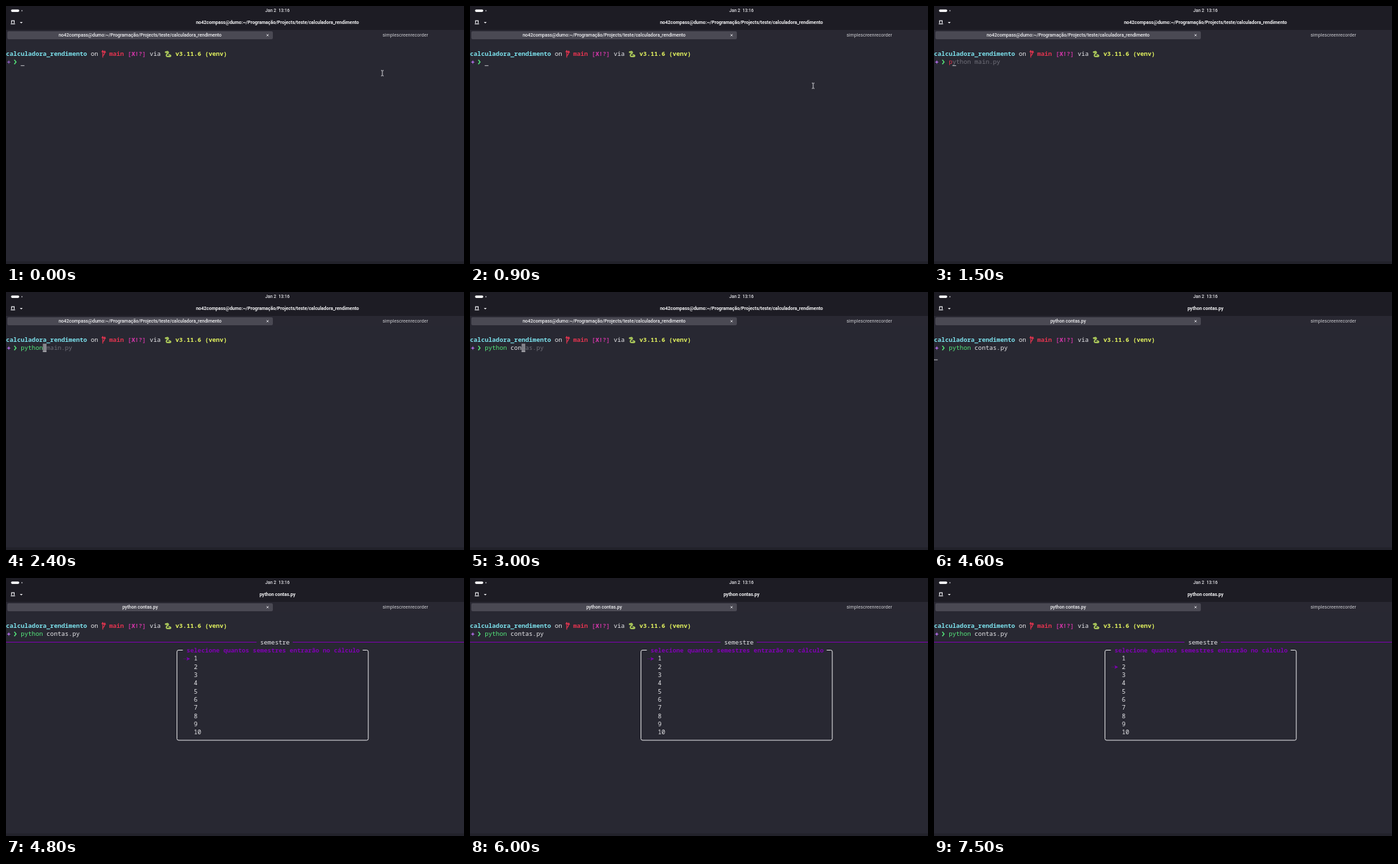
Animation, 690 px wide and 388 px high, one loop 8000 ms. Source, as an HTML page:

```html
<!DOCTYPE html>
<html lang="pt">
<head>
<meta charset="utf-8">
<title>Terminal</title>
<style>
  html, body { margin: 0; width: 100%; height: 100%; overflow: hidden; background: #282832; }
  svg { display: block; width: 690px; height: 388px; }
  text { white-space: pre; }
  .term text { font: 9.25px "Noto Sans Mono", "DejaVu Sans Mono", monospace; fill: #e9e9ec; }
  .term .b { font-weight: 700; }
  .ui text { font: 500 7px Roboto, "Open Sans", sans-serif; fill: #f2f2f4; text-anchor: middle; }
  .ui .title { font-weight: 700; }
  .ui .clock { font-size: 6.7px; fill: #e4e4e8; }
  .ui .idle { font-weight: 400; font-size: 7.1px; fill: #c9c9ce; }
  .term .cyan { fill: #7de3ee; }
  .term .red { fill: #e2344f; }
  .term .pink { fill: #c2359d; }
  .term .lime { fill: #e3f35f; }
  .term .green { fill: #55ea7c; }
  .term .hint { fill: #70707a; }
  .term .purple { fill: #8000b4; }
</style>
</head>
<body>
<svg viewBox="0 0 690 388">
  <rect width="690" height="388" fill="#282832"/>
  <g class="ui">
    <rect width="690" height="36" fill="#1d1c24"/>
    <rect y="36" width="690" height="15" fill="#292832"/>
    <rect x="2" y="38" width="400" height="12" rx="2" fill="#4a4953"/>
    <rect y="384" width="690" height="4" fill="#22222b"/>
    <rect x="7.5" y="5.3" width="12.5" height="3.6" rx="1.8" fill="#f4f4f6"/>
    <circle cx="24" cy="7.1" r="1.2" fill="#85858c"/>
    <text class="clock" x="409" y="9.4">Jan 2&#160; 13:16</text>
    <path d="M8.4 25.7V22.2H12.4V25.7M7.2 26.9H13.6" fill="none" stroke="#e6e6ea" stroke-width="1.2"/>
    <path d="M20.9 23.9H25.1L23 26.2Z" fill="#e6e6ea"/>
    <text class="title" id="title" x="409" y="27.1"></text>
    <text id="tab" x="202" y="46.4"></text>
    <path d="M392.6 42.4L395.6 45.4M395.6 42.4L392.6 45.4" stroke="#e6e6ea" stroke-width=".9"/>
    <text class="idle" x="601.5" y="46.4">simplescreenrecorder</text>
  </g>

  <g class="term">
    <g id="prompt"></g>
    <path d="M145.8 67.6V77.6M145.8 74.6C148.4 73.6 148.8 72 148.8 68.6M144.2 69.4L145.8 67L147.3 69.4M147.4 70.2L148.8 67.8L150.2 70.2"
      fill="none" stroke="#e2344f" stroke-width="1.2"/>
    <path d="M189.9 69.2L193.9 75M193.8 69L189.6 75.2" stroke="#c2359d" stroke-width="1.5"/>
    <g fill="none" stroke="#a9c65a" stroke-linecap="round">
      <path d="M241 69.2C244.6 67.6 245.6 70 243.2 71.6C240.4 73.6 241.4 75.9 243.6 75.9H247C249 75.6 248.2 73.4 245.6 73.6" stroke-width="2"/>
      <path d="M240.8 69.4H242.6" stroke-width="2.8"/>
    </g>
    <path id="star" d="M4.2 81.2L5 83.4L7.2 84.3L5 85.2L4.2 87.4L3.4 85.2L1.2 84.3L3.4 83.4Z"/>
    <path d="M12.5 80.9L15.2 84.2L12.5 87.5" fill="none" stroke="#55ea7c" stroke-width="1.4"/>

    <rect id="block" y="77.7" width="5.55" height="12" fill="#85858c"/>
    <text id="cmd" x="22.2" y="87.33"></text>
    <text id="arg" x="61.05" y="87.33"></text>
    <text id="hint" class="hint" y="87.33"></text>
    <rect id="line" width="5.55" height="1" fill="#c4c4c9"/>

    <g id="menu">
      <path d="M0 96.5H377.4M432 96.5H690" stroke="#8000b4"/>
      <path d="M266.4 108.5H260Q257.6 108.5 257.6 110.9V241.6Q257.6 244 260 244H543.4Q545.8 244 545.8 241.6V110.9Q545.8 108.5 543.4 108.5H537.4"
        fill="none" stroke="#e9e9ec"/>
      <g id="items"></g>
      <g id="arrow">
        <path d="M267 121.6H272" stroke="#8000b4" opacity=".35"/>
        <path d="M272 119L277.4 121.6L272 124.2L273 121.6Z" fill="#8000b4"/>
      </g>
    </g>
  </g>

  <path id="mouse" d="M-2 -4H-.6L0 -3.4L.6 -4H2M0 -3.4V3.4M-2 4H-.6L0 3.4L.6 4H2" fill="none" stroke="#e6e6ea" stroke-width=".9"/>
</svg>
<script>
const COL = 5.55, ROW = 12.33, BASE = 75, LOOP = 8000;
const PATH = "no42compass@dumo:~/Programação/Projects/teste/calculadora_rendimento";
const RUN = "python contas.py", OLD = "python main.py";
const $ = id => document.getElementById(id);
const el = {};
for (const id of ["title", "tab", "star", "block", "cmd", "arg", "hint", "line", "menu", "arrow", "mouse"]) el[id] = $(id);

function put(parent, col, row, str, cls = "") {
  const node = document.createElementNS("http://www.w3.org/2000/svg", "text");
  node.setAttribute("x", col * COL);
  node.setAttribute("y", BASE + row * ROW);
  node.setAttribute("class", cls);
  node.textContent = str;
  $(parent).append(node);
}

put("prompt", 0, 0, "calculadora_rendimento", "b cyan");
put("prompt", 23, 0, "on");
put("prompt", 28, 0, "main", "b red");
put("prompt", 33, 0, "[", "b pink");
put("prompt", 35, 0, "!?]", "b pink");
put("prompt", 39, 0, "via");
put("prompt", 46, 0, "v3.11.6 (venv)", "b lime");
put("items", 69, 2, "semestre");
put("items", 49, 3, "selecione quantos semestres entrarão no cálculo", "b purple");
for (let n = 1; n <= 10; n++) put("items", 51, 3 + n, String(n));

// Times at which each further key lands
const KEYS = [1500, 1800, 1900, 2000, 2200, 2400, 2600, 2700, 2800, 3000, 3100, 3200, 3500];
const ACCEPT = 4300, ENTER = 4500, MENU = 4800;
const MOUSE = [[0, 567, 101], [100, 550, 108], [200, 532, 115], [300, 517, 120]];
const PICK = [[MENU, 0], [6400, 1], [6900, 2], [7500, 1]];

const at = (steps, t) => steps.filter(s => s[0] <= t).pop() || steps[0];
const show = (node, on) => node.setAttribute("visibility", on ? "visible" : "hidden");
const move = (node, x, y) => node.setAttribute("transform", `translate(${x} ${y})`);
const label = (node, str) => { if (node.textContent !== str) node.textContent = str; };

function draw(t) {
  const count = t >= ACCEPT ? RUN.length : KEYS.filter(k => k <= t).length;
  const full = count < 8 ? OLD : RUN;
  const typed = full.slice(0, count);
  const running = t >= ENTER;

  label(el.title, running ? RUN : PATH);
  label(el.tab, running ? RUN : PATH);
  el.star.setAttribute("fill", t < 900 ? "#8a5cbb" : "#b26ee8");

  label(el.cmd, typed.slice(0, 6));
  el.cmd.setAttribute("class", count < 6 ? "red" : "green");
  label(el.arg, typed.slice(7));
  label(el.hint, count ? full.slice(count) : "");
  el.hint.setAttribute("x", (4 + count) * COL);

  el.block.setAttribute("x", (4 + count) * COL);
  show(el.block, count > 1 && t < ACCEPT);
  const blink = (t >= 300 && t < 900) || (t >= 4100 && t < ACCEPT);
  show(el.line, !blink && t < MENU);
  move(el.line, running ? 0 : (4 + count) * COL, running ? 101.5 : 89.2);

  show(el.menu, t >= MENU);
  move(el.arrow, 0, at(PICK, t)[1] * ROW);
  const [, x, y] = at(MOUSE, t);
  move(el.mouse, x, y);
  show(el.mouse, t < KEYS[0]);
}

const start = performance.now();
function tick() {
  draw((performance.now() - start) % LOOP);
  requestAnimationFrame(tick);
}
tick();
</script>
</body>
</html>
```
